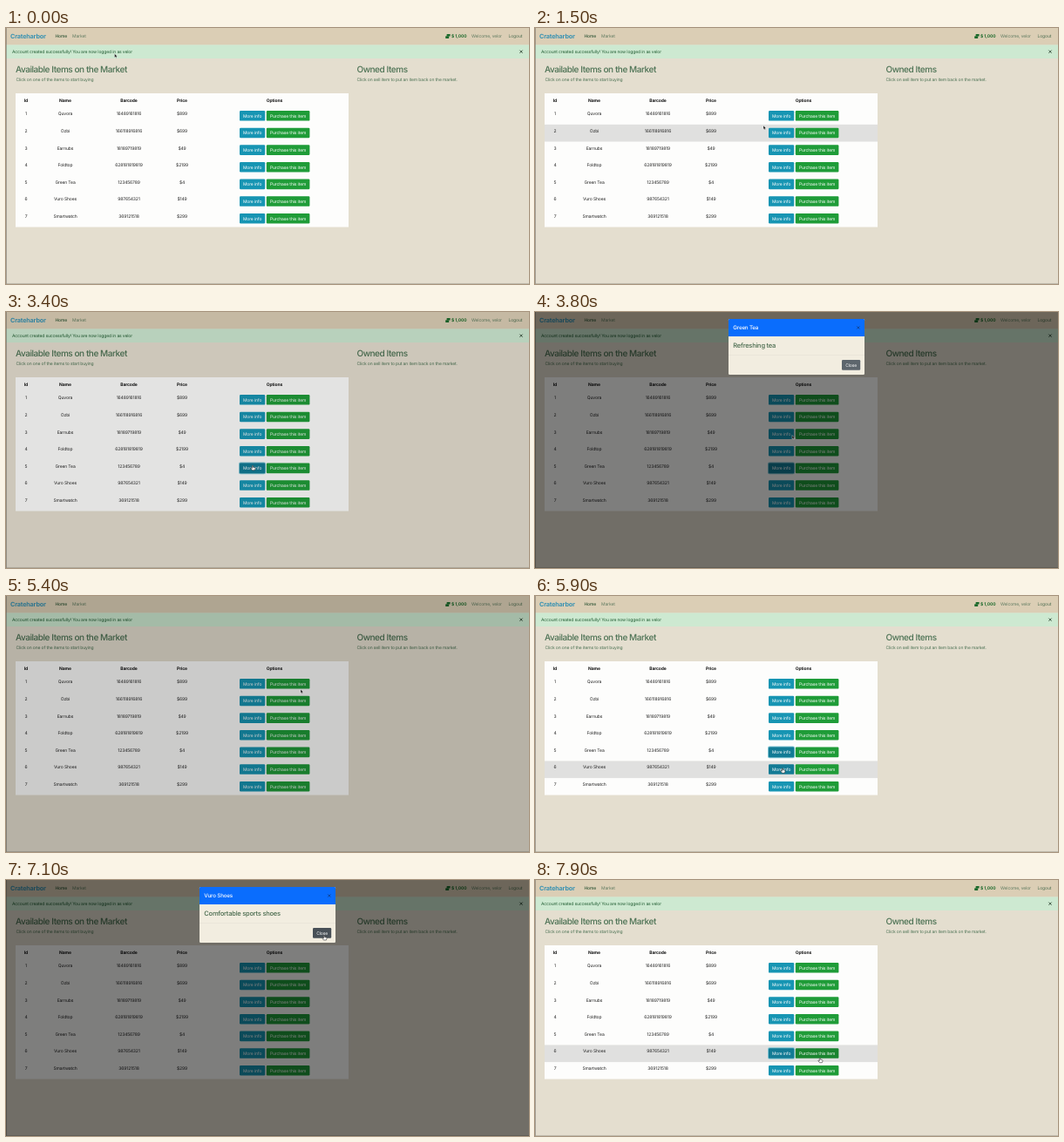
These frames come from a looping animation (600 by 294 pixels, 8000 ms). An HTML page:

```html
<!DOCTYPE html>
<html lang="en">
<head>
<meta charset="utf-8">
<title>Market demo</title>
<style>
  html, body { margin: 0; width: 100%; height: 100%; overflow: hidden; background: #e4decf; }
  svg { display: block; width: 600px; height: 294px; }
  text { font: 5px Inter, "Open Sans", sans-serif; letter-spacing: -.025em; text-rendering: geometricPrecision; white-space: pre; }
  .mid { text-anchor: middle; }
  .bold { font-weight: 700; }
  .h2 { font-size: 10px; font-weight: 500; letter-spacing: -.045em; }
  .brand { font-size: 7.2px; font-weight: 700; }
  .title { font-size: 6.25px; font-weight: 500; letter-spacing: -.03em; }
  .body { font-size: 7.5px; font-weight: 500; letter-spacing: -.03em; }
</style>
</head>
<body>
<svg id="stage" viewBox="0 0 600 294"></svg>
<script>
const LOOP = 8000, STEP = 100;
const ROW_TOP = 91.2, PITCH = 19.65;
const GREEN = '#4b7153', INFO = '#1795b3', INFO_DARK = '#137b95', BUY = '#1f9c38', BUY_DARK = '#1a842f', GREY = '#5d666d';
const stage = document.getElementById('stage');

function add(tag, attrs, parent = stage) {
  const el = document.createElementNS('http://www.w3.org/2000/svg', tag);
  for (const k in attrs) el.setAttribute(k, attrs[k]);
  return parent.appendChild(el);
}
const box = (x, y, width, height, fill, parent, more) => add('rect', { x, y, width, height, fill, ...more }, parent);
function label(x, y, str, fill, cls = '', parent) {
  const el = add('text', { x, y, fill, class: cls }, parent);
  el.textContent = str;
  return el;
}
function button(x, y, w, h, str, fill, parent) {
  const rect = box(x, y, w, h, fill, parent, { rx: 1.2 });
  label(x + w / 2, y + h / 2 + 1.8, str, '#fff', 'mid', parent);
  return { rect, hit: p => p.x >= x && p.x <= x + w && p.y >= y && p.y <= y + h };
}
const cross = (x, y, r, color, parent) => add('path', {
  d: `M${x - r} ${y - r}l${2 * r} ${2 * r}m0 ${-2 * r}l${-2 * r} ${2 * r}`, stroke: color, 'stroke-width': .9
}, parent);

// Navigation bar
box(0, 0, 600, 294, '#e4decf');
box(0, 0, 600, 19.4, '#dbceb5');
label(5, 11.7, 'Crateharbor', '#3b93b2', 'brand');
label(56.5, 11.2, 'Home', '#2d5435').style.fontWeight = 500;
label(76, 11.2, 'Market', '#617c62');
box(505.6, 7, 4, 2.6, '#1d6b2c', stage, { rx: .5 });
box(504.2, 9.2, 4, 2.8, '#1d6b2c', stage, { rx: .5 });
label(511, 11.2, '$ 1,000', '#1d6b2c', 'bold');
label(534, 11.2, 'Welcome, velor', '#617c62');
label(576.5, 11.2, 'Logout', '#4f6f53');

// Message
box(0, 19.4, 600, 15.6, '#cde9d1');
label(7, 28.7, 'Account created successfully! You are now logged in as velor', '#1f5b30');
cross(591, 27.2, 1.6, '#2d4633');

// Headings
label(11, 50.6, 'Available Items on the Market', GREEN, 'h2');
label(11.5, 60.6, 'Click on one of the items to start buying', GREEN);
label(402.5, 50.6, 'Owned Items', GREEN, 'h2');
label(402.5, 60.6, 'Click on sell item to put an item back on the market.', GREEN);

// Table
const COLS = [23, 68, 141, 202, 308];
box(11, 75, 382, 153.6, '#fdfdfc');
['Id', 'Name', 'Barcode', 'Price', 'Options'].forEach((s, i) => label(COLS[i], 84.8, s, '#111', 'mid bold'));
const rows = [
  ['Quvora', '16489161816', '$899'],
  ['Ozbi', '166118916816', '$699'],
  ['Earnubs', '18189719819', '$49'],
  ['Foldtop', '628181819819', '$2199'],
  ['Green Tea', '123456789', '$4'],
  ['Vuro Shoes', '987654321', '$149'],
  ['Smartwatch', '369121518', '$299']
].map((cells, i) => {
  const y = ROW_TOP + i * PITCH;
  const back = box(11, y, 382, PITCH, '#e0e0df');
  [i + 1, ...cells].forEach((s, c) => label(COLS[c], y + 9, s, '#222', 'mid'));
  const ring = box(267, y + 2.8, 31, 13.6, '#7fc3d2', stage, { rx: 2 });
  const info = button(268, y + 3.8, 29.2, 11.6, 'More info', INFO);
  const buy = button(298.8, y + 3.8, 49.6, 11.6, 'Purchase this item', BUY);
  return { y, back, ring, info, buy };
});

// Window edge
box(0, 0, .6, 294, '#77736b');
box(0, 293.5, 600, .5, '#9a968b');

// Dialog
const shade = box(0, 0, 600, 294, '#000');
const modal = add('g', {});
box(222, 8, 156, 64, '#f2ede0', modal, { rx: 1.2 });
add('path', { d: 'M222 28V9.2q0-1.2 1.2-1.2h153.6q1.2 0 1.2 1.2V28z', fill: '#0a6dfd' }, modal);
const title = label(227.3, 20.4, '', '#fff', 'title', modal);
cross(370.8, 18, 1.5, '#123f86', modal);
const message = label(227.3, 40.7, '', '#47694c', 'body', modal);
box(222, 49.2, 156, .4, '#dcd8cd', modal);
const close = button(352, 55, 21.2, 11.8, 'Close', GREY, modal);

// Pointers, hot spot at the origin
const arrow = add('path', { d: 'M0 0V4.4L1 3.5 1.7 5 2.4 4.7 1.8 3.2H3.1Z', fill: '#111', stroke: '#fff', 'stroke-width': .35 });
const hand = add('path', {
  d: 'M-.6 .3Q0-.4.6.3V2L2.6 2.5Q3.2 2.7 3 3.5L2.4 5.4H-.6L-2.1 3.4Q-2.2 2.5-1.3 2.9L-.6 3.4Z',
  fill: '#fff', stroke: '#111', 'stroke-width': .5
});

const visits = [
  { row: 4, open: 3370, shut: 5010, title: 'Green Tea', text: 'Refreshing tea' },
  { row: 5, open: 6070, shut: 7300, title: 'Vuro Shoes', text: 'Comfortable sports shoes' }
];
// time, x, y
const path = [
  [0, 124.6, 29.6], [500, 124.6, 29.6], [1500, 262, 112], [2400, 283, 176.3], [3450, 283, 176.3],
  [3800, 295, 141.5], [4450, 364, 63], [5050, 364, 63], [5400, 338, 107.2], [5900, 284, 197.8],
  [6350, 284, 197.8], [6950, 365, 63.6], [7350, 365, 63.6], [7850, 327, 204.3], [8000, 327, 204.3]
];
const clamp = v => Math.max(0, Math.min(1, v));
const easeOut = p => 1 - (1 - p) ** 2;
const show = (el, on) => el.setAttribute('visibility', on ? 'visible' : 'hidden');

function pointer(t) {
  const i = path.findIndex(k => k[0] > t);
  const [t0, x0, y0] = path[i - 1], [t1, x1, y1] = path[i];
  const p = (t - t0) / (t1 - t0);
  return { x: x0 + (x1 - x0) * p, y: y0 + (y1 - y0) * p };
}

function draw(t) {
  const p = pointer(t);
  const v = visits[t < 5500 ? 0 : 1];
  const dim = .5 * clamp((t - v.open) / 150) * clamp(1 - (t - v.shut - 300) / 150);
  const seen = clamp((t - v.open - 150) / 150) * clamp(1 - (t - v.shut) / 150);
  const slide = easeOut(clamp((t - v.open - 150) / 300)) - easeOut(clamp((t - v.shut) / 300));
  shade.setAttribute('opacity', dim);
  modal.setAttribute('opacity', seen);
  modal.setAttribute('transform', `translate(0 ${-15.6 * (1 - slide)})`);
  title.textContent = v.title;
  message.textContent = v.text;

  const focus = visits.find((d, i) => {
    const next = i ? LOOP : visits[1].open;
    return t >= d.open && t < d.open + 450 || t >= d.shut + 450 && t < next;
  });
  let overButton = false;
  rows.forEach((r, i) => {
    const free = dim === 0;
    const focused = !!focus && focus.row === i;
    const onInfo = r.info.hit(p), onBuy = r.buy.hit(p);
    show(r.back, free && p.x > 11 && p.x < 393 && p.y >= r.y && p.y < r.y + PITCH);
    show(r.ring, focused);
    r.info.rect.setAttribute('fill', focused || free && onInfo ? INFO_DARK : INFO);
    r.buy.rect.setAttribute('fill', free && onBuy ? BUY_DARK : BUY);
    if (dim < .5 && (onInfo || onBuy)) overButton = true;
  });
  const onClose = seen > 0 && close.hit(p);
  close.rect.setAttribute('fill', onClose ? '#485057' : GREY);
  const pointing = overButton || onClose;
  show(hand, pointing);
  show(arrow, !pointing);
  (pointing ? hand : arrow).setAttribute('transform', `translate(${p.x} ${p.y})`);
}

const start = performance.now();
function tick() {
  const t = (performance.now() - start) % LOOP;
  draw(Math.floor(t / STEP) * STEP);
  requestAnimationFrame(tick);
}
tick();
</script>
</body>
</html>
```
